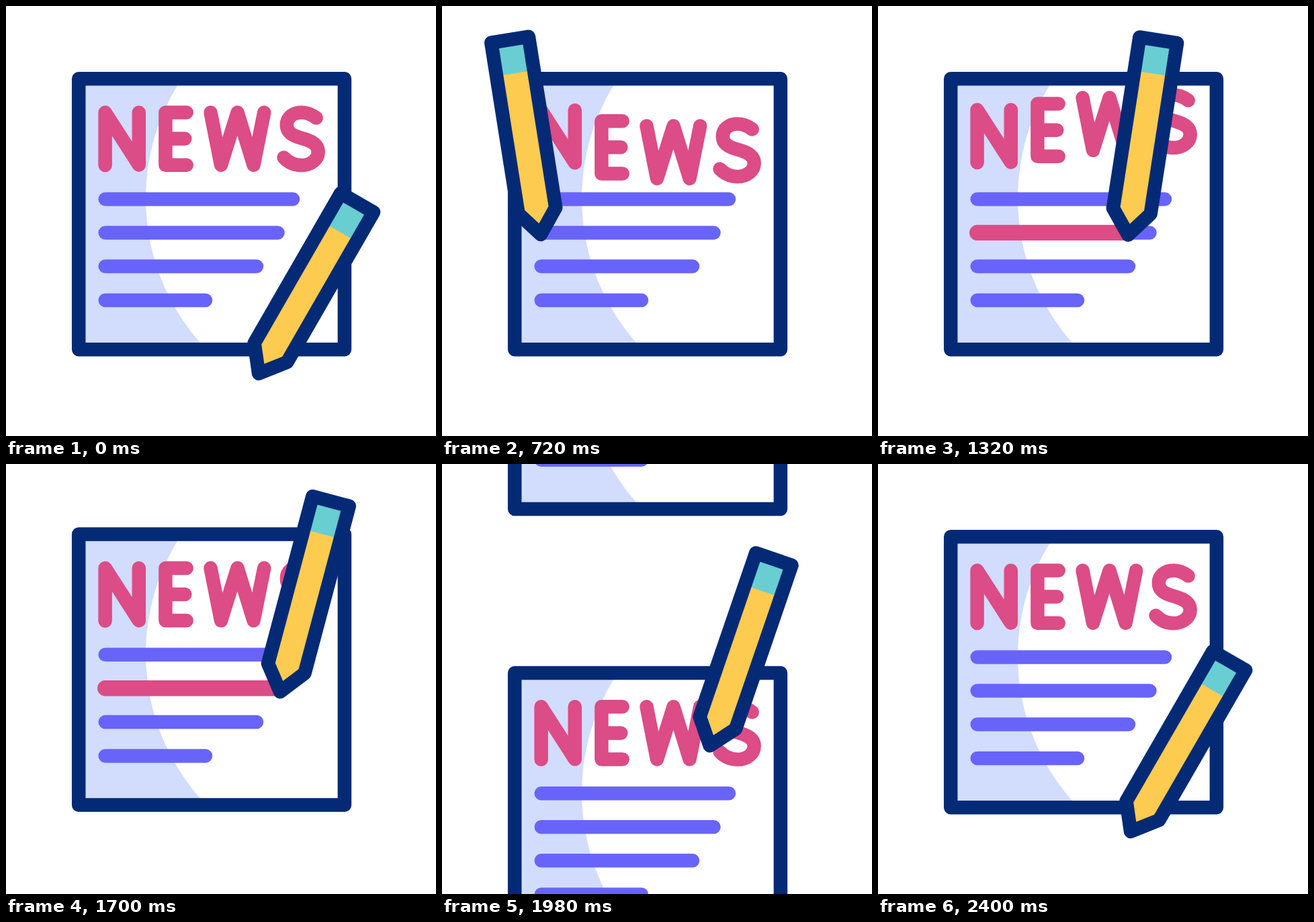
An HTML page for the animation above (2.42 s loop, 640 px wide and 640 px high).

```html
<!DOCTYPE html>
<html lang="en">
<head>
<meta charset="utf-8">
<title>News</title>
<style>
  html, body { margin: 0; width: 100%; height: 100%; overflow: hidden; background: #fff; }
  svg { display: block; width: 100vw; height: 100vh; }
  .stroke { fill: none; stroke-width: 20.5; stroke-linecap: round; stroke-linejoin: round; }
  .navy { stroke: #042a76; }
  .blue { stroke: #6864f9; }
  .pink { stroke: #dc4c86; }
</style>
</head>
<body>
<svg viewBox="0 0 640 640">
  <g id="page">
    <path fill="#fff" d="M108 108H504V511H108Z"/>
    <path fill="#d2dcfd" d="M108 108H261.5A325 325 0 0 0 298 511H108Z"/>
    <path class="stroke blue" d="M147.7 287.4H427M147.7 337.4H404.5M147.7 387.5H373M147.7 438H297"/>
    <line class="stroke pink" id="mark" x1="147.7" y1="337.4" x2="147.7" y2="337.4" style="stroke-width:23.4" visibility="hidden"/>
    <g class="stroke pink" id="word">
      <path d="M147.6 237V158.5L197.8 236.5V158.5"/>
      <path d="M268.7 158.5H237.4V236.7H268.7M237.4 197.6H266.3"/>
      <path d="M304.5 158.5L320 236.7L344.5 158.5L368.5 236.7L384.2 158.5"/>
      <path d="M461.7 166.5C455 161.5 448 158.5 440 158.5C427 158.5 417.8 166 417.8 177C417.8 188 426 193 441 197C457 201.5 464.7 207 464.7 217C464.7 229 453 237 440 237C429 237 420 232.5 413.5 225.5"/>
    </g>
    <path class="stroke navy" d="M108.2 108.2H503.9V511.2H108.2Z"/>
  </g>
  <g id="pencil">
    <path fill="#fdcb50" d="M-28.2 -183.5H28.2V74L0 110L-28.2 74Z"/>
    <path fill="#68ced2" d="M-28.2 -183.5H28.2V-133H-28.2Z"/>
    <path class="stroke navy" d="M-28.2 -183.5H28.2V74L0 110L-28.2 74Z"/>
  </g>
</svg>
<script>
const LOOP = 2420;
const SCROLL = 647;
const page = document.getElementById('page');
const pencil = document.getElementById('pencil');
const nextPage = page.cloneNode(true);
nextPage.querySelectorAll('[id]').forEach(el => el.removeAttribute('id'));
nextPage.removeAttribute('id');
page.after(nextPage);
const mark = document.getElementById('mark');
const letters = [...document.getElementById('word').children];

const ratio = (t, from, to) => Math.min(1, Math.max(0, (t - from) / (to - from)));
const ease = u => u * u * (3 - 2 * u);
// starts at rest, arrives with the given speed
const launch = (u, speed) => ease(u) + speed * u * u * (u - 1);
const mix = (a, b, p) => a + (b - a) * p;
const shiftY = (el, y) => el.setAttribute('transform', `translate(0 ${y})`);

const HOME = { x: 431, y: 451.7, a: 30 };
const LEFT = { x: 129.8, y: 231.4, a: -9 };
const RIGHT = { x: 436.3, y: 232.2, a: 14.9 };

function blend(from, to, px, py, pa) {
  return { x: mix(from.x, to.x, px), y: mix(from.y, to.y, py), a: mix(from.a, to.a, pa) };
}

function pencilPose(t) {
  if (t < 720) {
    const u = ratio(t, 0, 720), s = ease(u);
    const bend = 2 * s * (1 - s);
    return blend(HOME, LEFT, bend * 0.233 + s * s, bend + s * s, u);
  }
  if (t < 1680) {
    const u = ratio(t, 960, 1440), p = ease(u);
    return blend(LEFT, RIGHT, p, p, launch(u, 0.72));
  }
  const u = ratio(t, 1680, 2400), p = ease(u);
  return blend(RIGHT, HOME, p, p, launch(u, 1.1));
}

function letterShift(t) {
  return 20 * ease(ratio(t, 0, 480))
    - 46 * ease(ratio(t, 480, 960))
    + 26 * ease(ratio(t, 960, 1440));
}

function draw(t) {
  const scroll = SCROLL * ease(ratio(t, 1680, 2160));
  shiftY(page, -scroll);
  shiftY(nextPage, SCROLL - scroll);
  letters.forEach((el, i) => shiftY(el, letterShift(t - i * 120)));

  mark.setAttribute('visibility', t > 960 ? 'visible' : 'hidden');
  mark.setAttribute('x2', mix(147.7, 404.5, ease(ratio(t, 960, 1440))));

  const { x, y, a } = pencilPose(t);
  pencil.setAttribute('transform', `translate(${x} ${y}) rotate(${a})`);
}

const start = performance.now();
function tick() {
  draw((performance.now() - start) % LOOP);
  requestAnimationFrame(tick);
}
draw(0);
requestAnimationFrame(tick);
</script>
</body>
</html>
```
